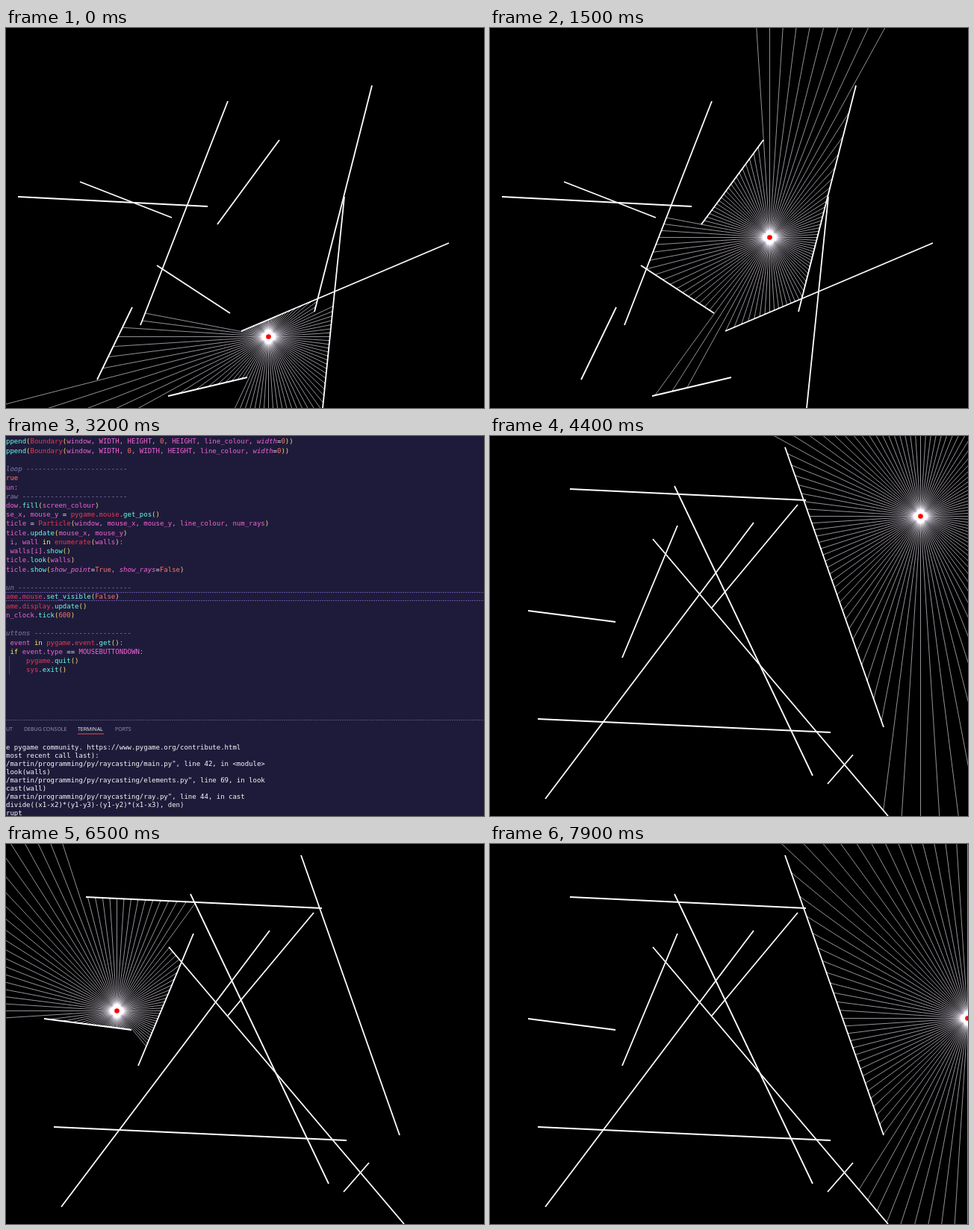
Animation, 640 px wide and 509 px high, one loop 8000 ms. Source, as an HTML page with a canvas:

```html
<!DOCTYPE html>
<html lang="en">
<head>
<meta charset="utf-8">
<title>Ray casting</title>
<style>
html, body { margin: 0; width: 100%; height: 100%; overflow: hidden; background: #000; }
canvas { display: block; }
</style>
</head>
<body>
<canvas id="stage" width="640" height="509"></canvas>
<script>
const ctx = document.getElementById('stage').getContext('2d');
const W = 640, H = 509, LOOP = 8000, STEP = 100, RAYS = 100;
const EDITOR_IN = 2600, EDITOR_OUT = 3500;

// Each wall: x1, y1, x2, y2
const roomA = [
  [16, 226, 270, 239], [99, 206, 222, 254], [297, 98, 180, 398], [366, 150, 283, 263],
  [202, 318, 300, 382], [169, 374, 122, 471], [217, 493, 323, 468], [315, 406, 593, 288],
  [490, 77, 413, 380], [453, 226, 424, H]
];
const roomB = [
  [107, 71, 423, 86], [247, 67, 432, 455], [251, 120, 177, 297], [218, 138, 533, H],
  [353, 116, 74, 486], [412, 92, 297, 230], [51, 234, 168, 249], [64, 379, 456, 397],
  [395, 15, 527, 390], [452, 466, 486, 427]
];

// Key points of the light: time, x, y
const pathA = [
  [0, 351, 413], [500, 265, 385], [1000, 318, 270], [1500, 374, 280], [2000, 540, 230], [2400, 590, 150]
];
const pathB = [
  [3500, 330, 450], [4400, 576, 107], [5200, 300, 207], [5600, 438, 285],
  [6000, 230, 395], [6500, 148, 223], [7200, 300, 250], [7900, 639, 233]
];

// Catmull-Rom through the key points
function along(path, t) {
  const last = path.length - 1;
  const now = Math.min(t, path[last][0]);
  let i = 0;
  while (i < last - 1 && now >= path[i + 1][0]) i++;
  const a = path[Math.max(i - 1, 0)], b = path[i], c = path[i + 1], d = path[Math.min(i + 2, last)];
  const u = (now - b[0]) / (c[0] - b[0]);
  return [1, 2].map(k => 0.5 + b[k] + u / 2 * (c[k] - a[k]
    + u * (2 * a[k] - 5 * b[k] + 4 * c[k] - d[k]
    + u * (3 * (b[k] - c[k]) + d[k] - a[k]))));
}

// Distance from a point to the nearest wall in one direction
function cast(x, y, dx, dy, walls) {
  let best = W + H;
  for (const [x1, y1, x2, y2] of walls) {
    const ex = x2 - x1, ey = y2 - y1, den = dx * ey - dy * ex;
    if (Math.abs(den) < 1e-9) continue;
    const dist = ((x1 - x) * ey - (y1 - y) * ex) / den;
    const s = ((x1 - x) * dy - (y1 - y) * dx) / den;
    if (dist > 0 && s >= 0 && s <= 1) best = Math.min(best, dist);
  }
  return best;
}

function line(x1, y1, x2, y2) {
  ctx.beginPath();
  ctx.moveTo(x1, y1);
  ctx.lineTo(x2, y2);
  ctx.stroke();
}

function drawRoom(walls, [x, y]) {
  ctx.fillStyle = '#000';
  ctx.fillRect(0, 0, W, H);
  ctx.lineWidth = 1.8;
  ctx.strokeStyle = '#fff';
  walls.forEach(w => line(...w));

  // Overlapping rays add up to the white core
  ctx.globalCompositeOperation = 'lighter';
  ctx.lineWidth = 1;
  ctx.strokeStyle = 'rgb(148,144,152)';
  for (let i = 0; i < RAYS; i++) {
    const a = i / RAYS * Math.PI * 2, dx = Math.cos(a), dy = Math.sin(a);
    const r = cast(x, y, dx, dy, walls);
    line(x, y, x + dx * r, y + dy * r);
  }
  ctx.globalCompositeOperation = 'source-over';

  ctx.fillStyle = '#f00';
  ctx.beginPath();
  ctx.arc(x, y, 3.3, 0, Math.PI * 2);
  ctx.fill();
}

const MONO = '9px "DejaVu Sans Mono", monospace', CHAR = 5.418;
const code = `ppend(Boundary(window, WIDTH, HEIGHT, 0, HEIGHT, line_colour, width=0))
ppend(Boundary(window, WIDTH, 0, WIDTH, HEIGHT, line_colour, width=0))

loop -------------------------
rue
un:
raw --------------------------
dow.fill(screen_colour)
se_x, mouse_y = pygame.mouse.get_pos()
ticle = Particle(window, mouse_x, mouse_y, line_colour, num_rays)
ticle.update(mouse_x, mouse_y)
 i, wall in enumerate(walls):
 walls[i].show()
ticle.look(walls)
ticle.show(show_point=True, show_rays=False)

un ----------------------------
ame.mouse.set_visible(False)
ame.display.update()
n_clock.tick(600)

uttons ------------------------
 event in pygame.event.get():
 if event.type == MOUSEBUTTONDOWN:
     pygame.quit()
     sys.exit()`.split('\n');
const terminal = `e pygame community. https://www.pygame.org/contribute.html
most recent call last):
/martin/programming/py/raycasting/main.py", line 42, in <module>
look(walls)
/martin/programming/py/raycasting/elements.py", line 69, in look
cast(wall)
/martin/programming/py/raycasting/ray.py", line 44, in cast
divide((x1-x2)*(y1-y3)-(y1-y2)*(x1-x3), den)
rupt`.split('\n');

function tokenColor(word, before, after) {
  if (/^(Boundary|Particle|enumerate|pygame|ame|mouse|display|sys)$/.test(word)) return '#f2344f';
  if (word === 'event' && before === '.') return '#f2344f';
  if (/^(in|if)$/.test(word)) return '#f4f468';
  if (/^(True|False|rue|\d+)$/.test(word)) return '#ff7468';
  if (/^\w/.test(word)) return after === '(' ? '#66ffe4' : '#f562d6';
  if (/[()]/.test(word)) return '#f2dc70';
  return word === '=' ? '#f4f0f4' : '#e884d0';
}

function drawCode(text, y) {
  if (text.includes('---')) {
    ctx.font = 'italic ' + MONO;
    ctx.fillStyle = '#827cac';
    ctx.fillText(text, 0, y);
    return;
  }
  for (const m of text.matchAll(/\w+|[^\w\s]/g)) {
    const word = m[0], end = m.index + word.length;
    const named = text[end] === '=' && /^\w/.test(word);
    ctx.font = (named ? 'italic ' : '') + MONO;
    ctx.fillStyle = tokenColor(word, text[m.index - 1], text[end]);
    ctx.fillText(word, m.index * CHAR, y);
  }
}

function dotted(y, color) {
  ctx.strokeStyle = color;
  ctx.lineWidth = 1;
  ctx.setLineDash([2, 1]);
  line(0, y, W, y);
  ctx.setLineDash([]);
}

function drawEditor() {
  ctx.fillStyle = '#1e1b3a';
  ctx.fillRect(0, 0, W, H);
  dotted(209.5, '#6450a0');
  dotted(220.5, '#6450a0');
  dotted(380.5, '#545070');
  ctx.strokeStyle = '#443e70';
  line(4.5, 295, 4.5, 319);
  code.forEach((text, i) => drawCode(text, 10.3 + i * 12.24));

  ctx.font = '7px "Open Sans", sans-serif';
  [['UT', 0], ['DEBUG CONSOLE', 24], ['TERMINAL', 96], ['PORTS', 146]].forEach(([label, x]) => {
    ctx.fillStyle = label === 'TERMINAL' ? '#f4f4f4' : '#9a98ac';
    ctx.fillText(label, x, 394.5);
  });
  ctx.fillStyle = '#ea5048';
  ctx.fillRect(96, 398.5, 35, 1);

  ctx.font = MONO;
  ctx.fillStyle = '#f8f8f8';
  terminal.forEach((text, i) => ctx.fillText(text, 0, 420.3 + i * 10.95));
}

function draw(t) {
  if (t < EDITOR_IN) drawRoom(roomA, along(pathA, t));
  else if (t < EDITOR_OUT) drawEditor();
  else drawRoom(roomB, along(pathB, t));
}

const start = performance.now();
function tick() {
  const t = (performance.now() - start) % LOOP;
  draw(Math.floor(t / STEP) * STEP);
  requestAnimationFrame(tick);
}
tick();
</script>
</body>
</html>
```
